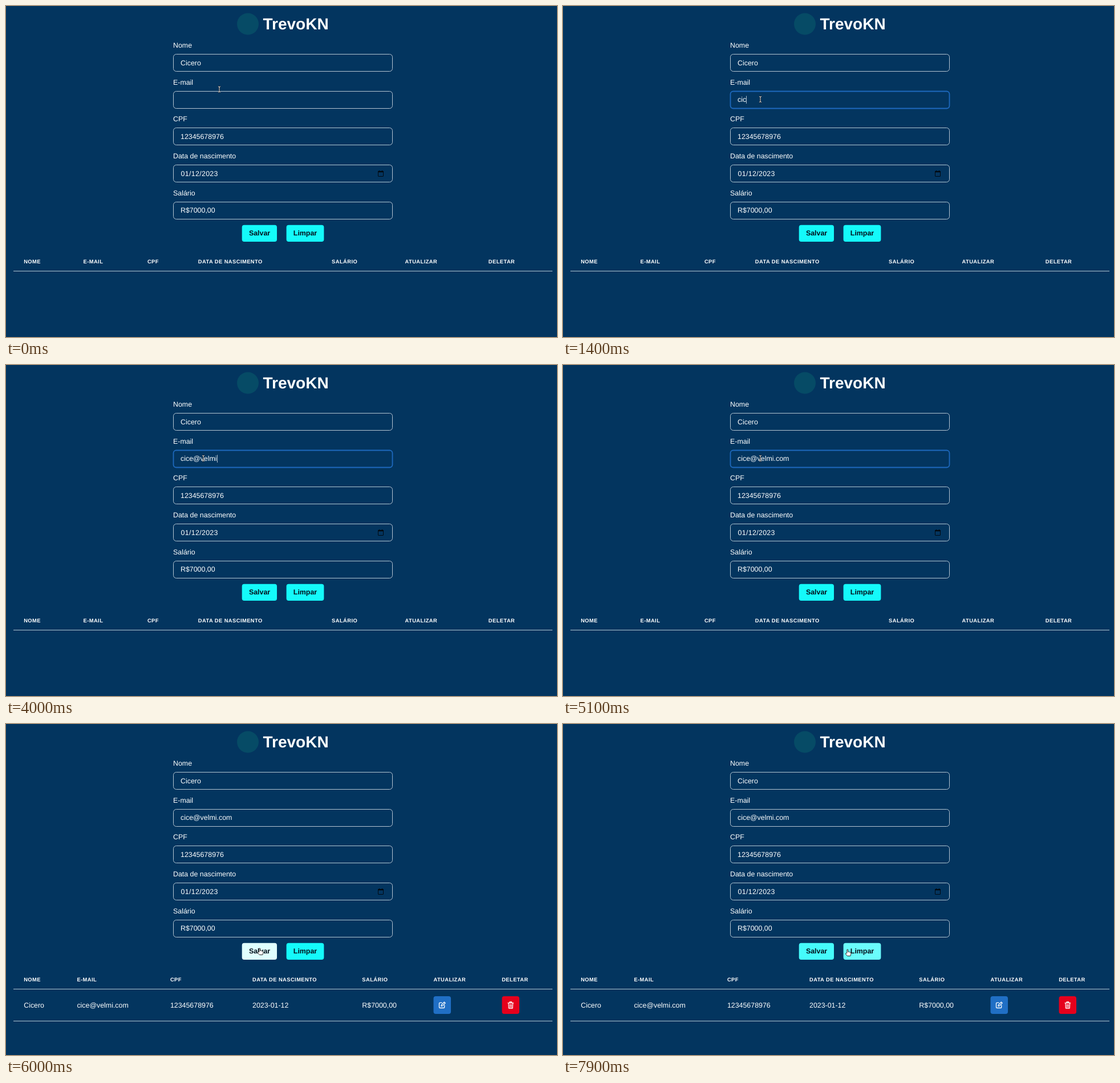
These frames come from a looping animation (966 by 580 pixels, 8 s). An HTML page:

```html
<!DOCTYPE html>
<html lang="pt-BR">
<head>
<meta charset="utf-8">
<title>Cadastro</title>
<style>
  html, body { margin: 0; width: 100%; height: 100%; overflow: hidden; background: #03355f; }
  svg { display: block; width: 100vw; height: 100vh; }
  text {
    font: 12.4px "Liberation Sans", Arial, sans-serif; fill: #fff;
    white-space: pre; text-rendering: geometricPrecision;
  }
  .title { font-size: 28px; font-weight: 700; }
  .box { fill: none; stroke: #b4c4d1; }
  .box.focus { stroke: #1e69bd; stroke-width: 1.8; }
  .date { letter-spacing: .33px; }
  .btn { font-weight: 700; fill: #03101c; text-anchor: middle; }
  .head { font-size: 9.3px; font-weight: 700; letter-spacing: .465px; }
  .line { stroke: #b4c4d1; }
  .tip { font: 12.8px "Noto Sans", "Open Sans", sans-serif; fill: #2e2e2e; }
  .icon { fill: none; stroke: #fff; stroke-width: 1.3; stroke-linejoin: round; stroke-linecap: round; }
  #caret { stroke: #b4c4d1; }
</style>
</head>
<body>
<svg viewBox="0 0 966 580">
  <rect width="966" height="580" fill="#03355f"/>
  <circle cx="424" cy="31.5" r="19" fill="#064b66"/>
  <text class="title" x="450.5" y="41">TrevoKN</text>

  <g id="form"></g>
  <path id="caret" d="M.5 157.5V171"/>
  <g fill="none" stroke="#020a12">
    <rect x="652.5" y="289.5" width="9" height="9" rx=".5"/>
    <path d="M652 290.5h10" stroke-width="2"/>
    <path d="M654.5 288v2M659.5 288v2"/>
  </g>

  <rect id="save" x="413.7" y="383.7" width="61.3" height="29.2" rx="4"/>
  <text class="btn" x="444.5" y="402">Salvar</text>
  <rect id="clear" x="491.6" y="383.7" width="65.8" height="29.2" rx="4"/>
  <text class="btn" x="524.5" y="402">Limpar</text>

  <g id="heads"></g>
  <path class="line" d="M13 464.5H958"/>
  <g id="row">
    <path class="line" d="M13 520.5H958"/>
    <rect x="749.5" y="477" width="30.5" height="31" rx="4" fill="#206fc5"/>
    <g class="icon">
      <path d="M764 488.3h-3.2q-1.3 0-1.3 1.3v6.6q0 1.3 1.3 1.3h6.6q1.3 0 1.3-1.3v-3.2"/>
      <path d="M763 494.3l.4-2.2 4.9-4.9 1.8 1.8-4.9 4.9z"/>
    </g>
    <rect x="869.5" y="477" width="30.5" height="31" rx="4" fill="#e6001c"/>
    <g class="icon">
      <path d="M880 488.8h9.6M883 488.3v-1.3h3.6v1.3"/>
      <path d="M881 489.5l.5 8.5h6.6l.5-8.5M883.6 491.3v4.7M886 491.3v4.7"/>
    </g>
  </g>

  <g id="tip">
    <path d="M379 188.5L386 181.5L393 188.5z" fill="#fff"/>
    <rect x="369" y="188" width="175.5" height="33.5" rx="3" fill="#fff"/>
    <text class="tip" x="378" y="209">lcsvieta.nop@velmi.com</text>
  </g>

  <g id="cursor">
    <g id="beam" fill="none">
      <path d="M-2 -5Q0 -5 0 -3.5Q0 -5 2 -5M0 -4V4M-2 5Q0 5 0 3.5Q0 5 2 5" stroke="#10161c" stroke-width="2.4"/>
      <path d="M-2 -5Q0 -5 0 -3.5Q0 -5 2 -5M0 -4V4M-2 5Q0 5 0 3.5Q0 5 2 5" stroke="#e4e8ec"/>
    </g>
    <path id="arrow" d="M.5 .5V10L2.7 8L4.3 11.5L6 10.7L4.5 7.3H7.3z" fill="#10161c" stroke="#e8ecf0" stroke-width=".9"/>
    <path id="hand" d="M-1.2 6.5V1Q-1.2 0 -.2 0Q.8 0 .8 1V4.3Q2 3.7 2.6 4.6Q3.8 4.2 4.3 5.1Q5.8 4.9 5.8 6.3V8.5L4.8 11.5H-.5L-3.5 8Q-4 6.8 -2.8 6.6Z" fill="#fff" stroke="#111" stroke-width=".9"/>
  </g>
</svg>
<script>
const $ = id => document.getElementById(id);
const LOOP = 8000;
const MAIL = "cice@velmi.com";

function add(parent, tag, attrs, text = "") {
  const el = document.createElementNS("http://www.w3.org/2000/svg", tag);
  for (const k in attrs) el.setAttribute(k, attrs[k]);
  el.textContent = text;
  return parent.appendChild(el);
}

const fields = [
  ["Nome", "Cicero"], ["E-mail", ""], ["CPF", "12345678976"],
  ["Data de nascimento", "01/12/2023"], ["Salário", "R$7000,00"]
].map(([label, value], i) => {
  const y = i * 64.7;
  const isDate = i === 3;
  add($("form"), "text", { x: 293, y: 72.8 + y }, label);
  const box = add($("form"), "rect",
    { class: "box", x: 293.5, y: Math.round(84 + y) + .5, width: 384, height: 30, rx: 5 });
  const text = add($("form"), "text",
    { class: isDate ? "date" : "", x: isDate ? 306.5 : 306, y: 103.6 + y }, value);
  return { box, text };
});
const mail = fields[1];

const emptyX = [31.2, 135.5, 247.9, 336.8, 571.1, 699.5, 845.8];
const filledX = [31.2, 124.4, 287.9, 432, 624.3, 749.4, 869.2];
const heads = ["NOME", "E-MAIL", "CPF", "DATA DE NASCIMENTO", "SALÁRIO", "ATUALIZAR", "DELETAR"]
  .map(s => add($("heads"), "text", { class: "head", y: 451.3 }, s));
["Cicero", MAIL, "12345678976", "2023-01-12", "R$7000,00"]
  .forEach((s, i) => add($("row"), "text", { x: filledX[i], y: 496.5 }, s));

// Each track holds [time, ...values], kept until the next entry.
const pointer = [
  [0, 374, 146, "beam"], [100, 360, 155, "beam"], [200, 346, 163.5, "beam"],
  [5300, 338, 186, "arrow"], [5400, 312, 238, "beam"], [5500, 336, 330, "arrow"],
  [5600, 416, 409, "hand"], [5700, 445, 393, "hand"],
  [6100, 620, 325, "arrow"], [6200, 834, 222, "arrow"], [6400, 847, 161, "arrow"],
  [6600, 843, 166, "arrow"], [6700, 826, 182, "arrow"], [6800, 807, 201, "arrow"],
  [7000, 760, 278, "arrow"], [7100, 691, 390, "arrow"], [7200, 636, 474, "arrow"],
  [7300, 602, 525, "arrow"], [7500, 668, 450, "arrow"], [7600, 520, 327, "arrow"],
  [7700, 298, 368, "beam"], [7800, 440, 398, "hand"], [7900, 499, 395, "hand"]
];
const typed = [
  [0, 0], [1100, 1], [1200, 2], [1400, 3], [1500, 4], [2400, 5], [2900, 6], [3100, 7],
  [3200, 8], [3300, 9], [4000, 10], [4200, 11], [4300, 13], [4400, 14]
];
const caretOn = [[0, 0], [400, 1], [2100, 0], [2400, 1], [5100, 0]];
const saveGlow = [[0, 0], [5600, .5], [5700, 1], [6100, .3], [6200, 0], [7800, .6], [7900, .24]];
const clearGlow = [[0, 0], [7900, .42]];

const at = (track, t) => track.findLast(e => e[0] <= t).slice(1);
const show = (el, on) => el.setAttribute("visibility", on ? "visible" : "hidden");
const glow = k => `rgb(${20 + k * 204},${250 + k * 5},${250 + k * 4})`;

function draw(t) {
  const [x, y, shape] = at(pointer, t);
  $("cursor").setAttribute("transform", `translate(${x} ${y})`);
  for (const id of ["beam", "arrow", "hand"]) show($(id), id === shape);

  const count = at(typed, t)[0];
  mail.text.textContent = MAIL.slice(0, count);
  const end = count ? mail.text.getComputedTextLength() : 0;
  $("caret").setAttribute("transform", `translate(${Math.round(306 + end)} 0)`);
  show($("caret"), at(caretOn, t)[0]);
  mail.box.classList.toggle("focus", t >= 400 && t < 5900);
  show($("tip"), t >= 600 && t < 1200);

  $("save").setAttribute("fill", glow(at(saveGlow, t)[0]));
  $("clear").setAttribute("fill", glow(at(clearGlow, t)[0]));

  const saved = t >= 5900;
  show($("row"), saved);
  heads.forEach((h, i) => h.setAttribute("x", (saved ? filledX : emptyX)[i]));
}

const start = performance.now();
function tick() {
  draw((performance.now() - start) % LOOP);
  requestAnimationFrame(tick);
}
tick();
</script>
</body>
</html>
```
